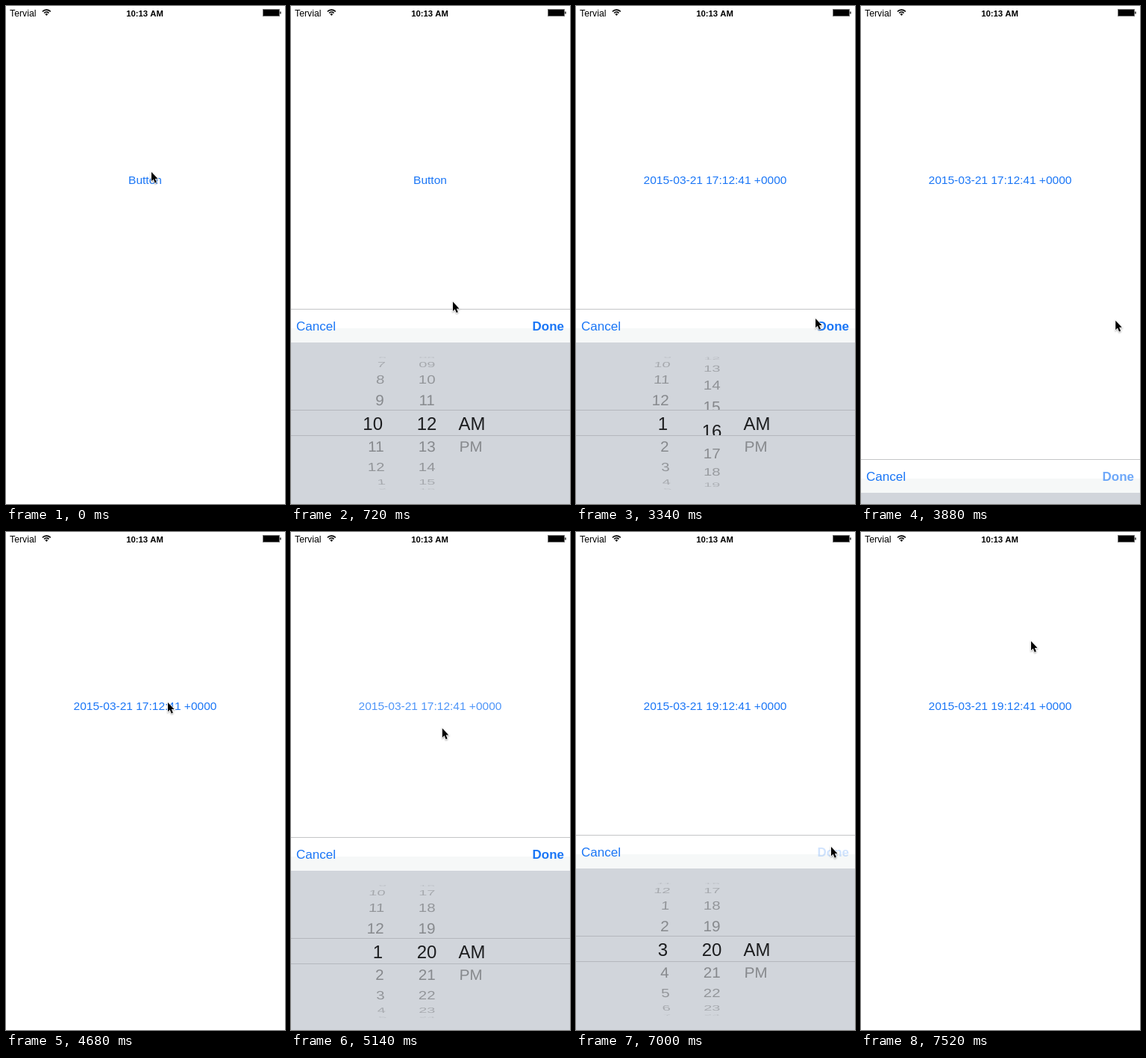
Write an HTML page with a canvas that moves like this. It is 374x666 px and loops after 7540 ms.

```html
<!DOCTYPE html>
<html lang="en">
<head>
<meta charset="utf-8">
<title>Time picker</title>
<style>
  html, body { margin: 0; width: 100%; height: 100%; overflow: hidden; background: #fff; }
  canvas { display: block; }
</style>
</head>
<body>
<canvas id="stage" width="374" height="666"></canvas>
<script>
const ctx = document.getElementById('stage').getContext('2d');
const W = 374, H = 666, LOOP = 7540, SHEET_HEIGHT = 261;
const BLUE = '#1a76f6', FONT = '"Liberation Sans", Arial, sans-serif';

const linear = u => u;
const easeInOut = u => u < 0.5 ? 2 * u * u : 1 - 2 * (1 - u) ** 2;
const easeOut = u => Math.sin(u * Math.PI / 2);

// Rises from 0 to 1 between two times.
const ramp = (t, from, to, ease = linear) =>
  ease(Math.min(1, Math.max(0, (t - from) / (to - from))));

// A pressed button dims at once and fades back after its release.
const pressAlpha = (t, down, up) => 1 - 0.8 * (ramp(t, down, down + 20) - ramp(t, up, up + 350));

const slide = (t, start) => ramp(t, start, start + 300, easeInOut);
const sheetTop = t => H - SHEET_HEIGHT *
  (slide(t, 290) - slide(t, 3683) + slide(t, 4864) - slide(t, 7000));

const hourAt = t => 10 + 1.5 * ramp(t, 1860, 2040) + 1.5 * ramp(t, 2040, 2760, easeOut)
  + 2.08 * ramp(t, 5980, 6260) - 0.08 * ramp(t, 6440, 6600);
const minuteAt = t => 12 + 8 * ramp(t, 3120, 3840, easeOut);
const periodAt = t => ramp(t, 1140, 1440, easeInOut) - ramp(t, 2200, 2480, easeInOut);

function titleAt(t) {
  if (t < 2100) return 'Button';
  const hour = t < 2760 ? 14 : t < 6600 ? 17 : 19;
  return `2015-03-21 ${hour}:12:41 +0000`;
}

// The pointer rests between moves: departure, arrival, place.
const DONE = [342, 421], HOURS = [105, 577];
const POINTER_START = [195, 222];
const POINTER_MOVES = [
  [420, 980, [236, 545]],
  [1120, 1400, [238, 439]],
  [1400, 1860, [92, 525]],
  [1860, 2200, [89, 440]],
  [2200, 2880, [176, 575]],
  [3120, 3340, [321, 418]],
  [3340, 3480, DONE],
  [3880, 4200, [105, 363]],
  [4360, 4680, [217, 228]],
  [4860, 5140, [203, 262]],
  [5140, 5700, HOURS],
  [5980, 6260, [111, 498]],
  [6440, 6860, DONE],
  [7060, 7340, [246, 197]],
  [7480, 7520, [228, 146]],
];

const pointerAt = t => POINTER_MOVES.reduce((place, [from, to, goal]) => {
  const u = ramp(t, from, to);
  return place.map((v, i) => v + (goal[i] - v) * u);
}, POINTER_START);

function text(str, x, y, size, { color = BLUE, align = 'left', weight = '', alpha = 1 } = {}) {
  ctx.font = `${weight} ${size}px ${FONT}`;
  ctx.textAlign = align;
  ctx.fillStyle = color;
  ctx.globalAlpha = alpha;
  ctx.fillText(str, x, y);
  ctx.globalAlpha = 1;
}

function rect(color, x, y, w, h) {
  ctx.fillStyle = color;
  ctx.fillRect(x, y, w, h);
}

function drawStatusBar() {
  text('Tervial', 5, 13.6, 12.3, { color: '#000' });
  text('10:13 AM', 186, 13.5, 11.3, { color: '#000', align: 'center', weight: 'bold' });
  ctx.strokeStyle = ctx.fillStyle = '#000';
  ctx.lineWidth = 1.6;
  for (const r of [4.4, 7.4]) {
    ctx.beginPath();
    ctx.arc(54.3, 12.5, r, -Math.PI * 0.76, -Math.PI * 0.24);
    ctx.stroke();
  }
  ctx.beginPath();
  ctx.moveTo(54.3, 13);
  ctx.arc(54.3, 12.5, 2.4, -Math.PI * 0.78, -Math.PI * 0.22);
  ctx.fill();
  ctx.lineWidth = 1;
  ctx.strokeStyle = '#777';
  ctx.strokeRect(344.5, 4.5, 22, 9);
  rect('#000', 345, 5, 21, 8);
  rect('#000', 367.3, 7.5, 1.3, 3);
}

const BAND = 17, REACH = 108;
const RADIUS = 89, ROW_ANGLE = 0.358, ROW = RADIUS * ROW_ANGLE;
const SMALL = 21.2, MAGNIFY = 1.13;

function clipped(rects, paint) {
  ctx.save();
  ctx.beginPath();
  for (const r of rects) ctx.rect(...r);
  ctx.clip();
  paint();
  ctx.restore();
}

// One picker column on a cylinder, with a magnified copy inside the selection band.
function drawWheel(x, align, position, label, center) {
  const nearest = Math.round(position);
  const eachRow = (span, paint) => {
    for (let i = nearest - span; i <= nearest + span; i++) {
      if (label(i)) paint(label(i), i - position);
    }
  };

  const outside = [[0, center - REACH, W, REACH - BAND], [0, center + BAND, W, REACH - BAND]];
  clipped(outside, () => eachRow(4, (str, offset) => {
    const angle = offset * ROW_ANGLE, cos = Math.cos(angle), sin = Math.sin(angle);
    if (cos < 0.06) return;
    const scale = 0.98 - 0.07 * (1 - cos);
    const skew = (W / 2 - x) * 0.1 * sin / RADIUS;
    ctx.save();
    ctx.transform(scale, 0, skew, cos, W / 2 + (x - W / 2) * scale, center + RADIUS * sin);
    text(str, 0, SMALL * 0.36, SMALL, { color: '#000', align, alpha: 0.04 + 0.34 * cos });
    ctx.restore();
  }));

  clipped([[0, center - BAND, W, BAND * 2]], () => eachRow(1, (str, offset) => {
    const size = SMALL * MAGNIFY;
    text(str, x, center + offset * ROW * MAGNIFY + size * 0.36, size, { color: '#1c1d1f', align });
  }));
}

function drawSheet(t, top) {
  const y = Math.round(top), center = y + 153;
  rect('#fff', 0, y, W, SHEET_HEIGHT);
  rect('#f6f8f8', 0, y + 26, W, 19);
  rect('#c4c5c7', 0, y, W, 1);
  text('Cancel', 7, y + 28.5, 17);
  text('Done', 366, y + 28.5, 17, {
    align: 'right', weight: 'bold',
    alpha: pressAlpha(t, 3560, 3690) * pressAlpha(t, 6880, 7000),
  });

  rect('#d1d5db', 0, y + 45, W, 216);
  drawWheel(123, 'right', hourAt(t), i => String((i + 11) % 12 + 1), center);
  drawWheel(182, 'center', minuteAt(t), i => String(i).padStart(2, '0'), center);
  drawWheel(242.5, 'center', periodAt(t), i => ['AM', 'PM'][i], center);
  rect('#b4b7bd', 0, center - 18, W, 1);
  rect('#b4b7bd', 0, center + 16, W, 1);
}

const ARROW = new Path2D('M0 0V13L3 10.3L5.3 15.4L7.6 14.4L5.4 9.5H9.4Z');

function drawPointer([x, y]) {
  ctx.save();
  ctx.translate(x, y);
  ctx.scale(0.9, 0.95);
  ctx.shadowColor = 'rgba(0,0,0,.35)';
  ctx.shadowBlur = 2;
  ctx.shadowOffsetY = 1;
  ctx.lineWidth = 1.6;
  ctx.strokeStyle = '#fff';
  ctx.stroke(ARROW);
  ctx.shadowColor = 'transparent';
  ctx.fillStyle = '#000';
  ctx.fill(ARROW);
  ctx.restore();
}

function draw(t) {
  rect('#fff', 0, 0, W, H);
  drawStatusBar();
  text(titleAt(t), 186.5, 238, 15.5, {
    align: 'center',
    alpha: pressAlpha(t, 220, 300) * pressAlpha(t, 4840, 4890),
  });
  const top = sheetTop(t);
  if (top < H) drawSheet(t, top);
  drawPointer(pointerAt(t));
}

const start = performance.now();
function frame() {
  draw((performance.now() - start) % LOOP);
  requestAnimationFrame(frame);
}
frame();
</script>
</body>
</html>
```
